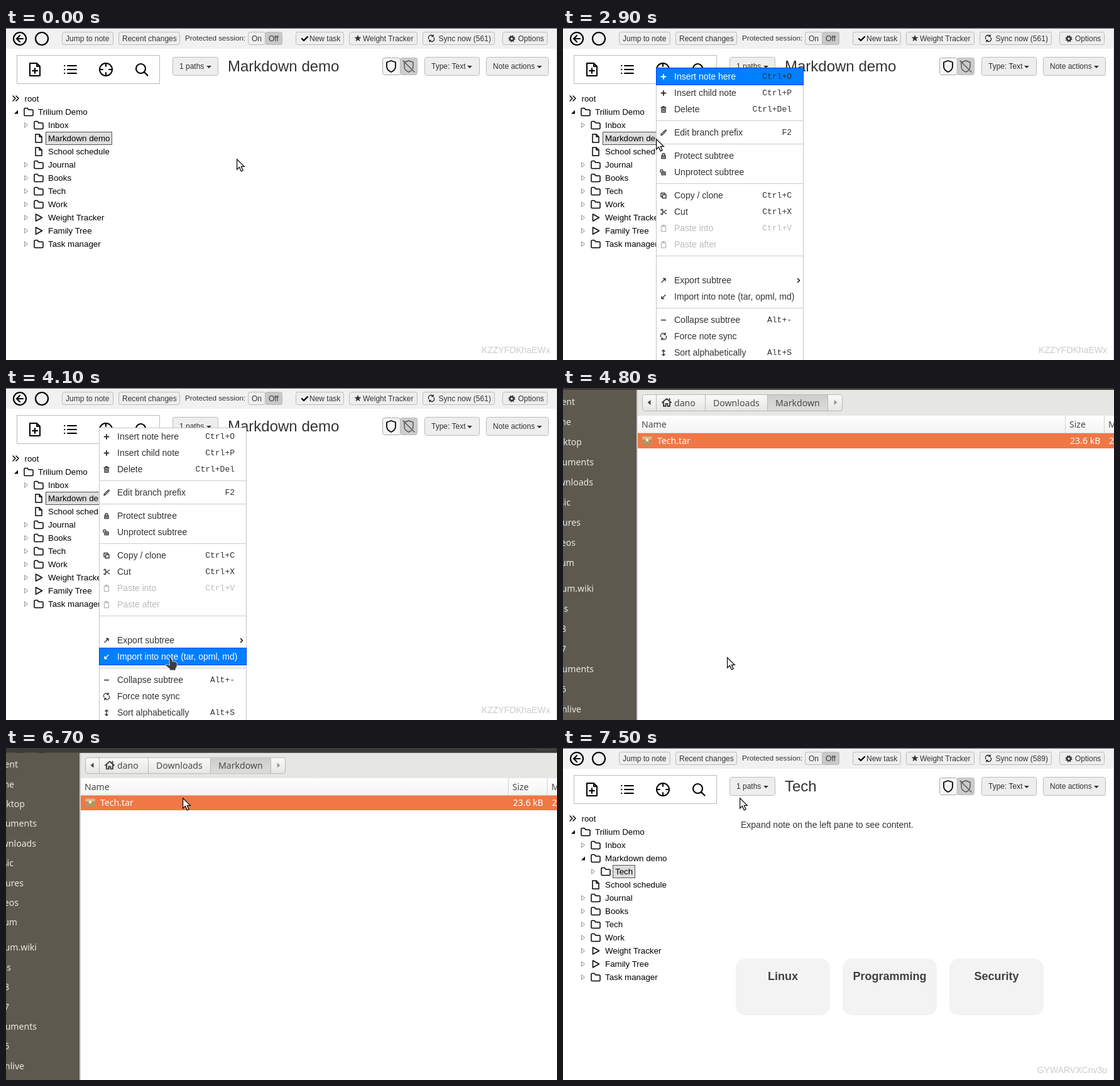
Write an HTML page that moves like this. It is 877x528 px and loops after 8000 ms.

```html
<!DOCTYPE html>
<html lang="en">
<head>
<meta charset="utf-8">
<title>Importing into a note</title>
<style>
  html, body { margin: 0; width: 100%; height: 100%; overflow: hidden; background: #fff; }
  svg { display: block; font-family: "Liberation Sans", Arial, sans-serif; }
  .mono { font: 13px "Liberation Mono", monospace; }
  .files { font-family: "Noto Sans", sans-serif; }
  .line { fill: none; stroke: currentColor; stroke-linecap: round; stroke-linejoin: round; }
</style>
</head>
<body>
<svg id="stage" width="877" height="528" viewBox="0 0 877 528"></svg>
<script>
const rect = (x, y, w, h, fill, stroke = 'none', rx = 0, more = '') =>
  `<rect x="${x}" y="${y}" width="${w}" height="${h}" fill="${fill}" stroke="${stroke}" rx="${rx}" ${more}/>`;
const text = (x, y, str, size = 12, fill = '#333', more = '') =>
  `<text x="${x}" y="${y}" font-size="${size}" fill="${fill}" ${more}>${str}</text>`;
const line = (d, x, y, width = 1.6, more = '') =>
  `<path class="line" d="${d}" transform="translate(${x} ${y})" stroke-width="${width}" ${more}/>`;
const solid = (d, x, y, fill = '#333') =>
  `<path d="${d}" transform="translate(${x} ${y})" fill="${fill}"/>`;
const group = (id, body, more = '') => `<g id="${id}" ${more}>${body}</g>`;

const SYNC = 'M-4 1A4 4 0 0 1 3-3M4-1A4 4 0 0 1-3 3M3-5.5V-3H.5M-3 5.5V3H-.5';
const FOLDER = 'M-7 4.5V-4.5Q-7-6-5.5-6H-2L0-3.5H5.5Q7-3.5 7-2V4.5Q7 6 5.5 6H-5.5Q-7 6-7 4.5Z';
const PAGE = 'M-5-6.5H1L5-2.5V6.5H-5ZM1-6.5V-2.5H5';
const PLAY = 'M-4.5-5.5L5.5 0L-4.5 5.5Z';
const CARET = 'M-4-2H4L0 2Z';
const SHIELD = 'M0-9L7-6.5V0Q7 6 0 9Q-7 6-7 0V-6.5Z';

// Main window
const button = (x, y, w, h, label, textX, fill = '#eee') =>
  rect(x + .5, y + .5, w - 1, h - 1, fill, '#bbb', 3) + text(textX, y + h / 2 + 4, label);

function star() {
  let d = '';
  for (let i = 0; i < 10; i++) {
    const a = i * Math.PI / 5, r = i % 2 ? 2.4 : 5.8;
    d += `${i ? 'L' : 'M'}${(r * Math.sin(a)).toFixed(2)} ${(-r * Math.cos(a)).toFixed(2)}`;
  }
  return d + 'Z';
}

const topBar = sync =>
  rect(0, 0, 877, 33, '#f1f1f1') + rect(0, 0, 877, 1, '#555') +
  [22, 57].map((x, i) =>
    `<circle cx="${x}" cy="17" r="10" fill="none" stroke="#000" stroke-width="2.2"/>` +
    line('M-5 0H5M0-5L-5 0L0 5', x, 17, 2.2, i ? 'style="rotate:180deg"' : '')).join('') +
  button(89, 6, 82, 21, 'Jump to note', 95) + button(179, 6, 98, 21, 'Recent changes', 185) +
  text(285, 20, 'Protected session:', 11.7) +
  button(385, 6, 28, 21, 'On', 391) + button(412, 6, 28, 21, 'Off', 418, '#c8c8c8') +
  button(461, 6, 77, 21, 'New task', 483) + line('M-4 0L-1 3L5-3', 475, 17, 2.4) +
  button(546, 6, 109, 21, 'Weight Tracker', 568) + solid(star(), 560, 16.5) +
  button(663, 6, 115, 21, `Sync now (${sync})`, 688.5) + line(SYNC, 677, 16.5, 1.2) +
  button(790, 6, 72, 21, 'Options', 815) +
  `<circle cx="805" cy="17" r="3" fill="none" stroke="#333" stroke-width="2.4"/>` +
  `<circle cx="805" cy="17" r="4.7" fill="none" stroke="#333" stroke-width="1.6" stroke-dasharray="1.85"/>`;

const noteHeader = title =>
  rect(17.5, 43.5, 227, 45, '#fff', '#bbb') +
  line('M-8-10H3L8-5V10H-8ZM3-10V-5H8M-4 2H4M0-2V6', 46, 66, 2) +
  line('M-4-6H10M-4 0H10M-4 6H10M-9-6H-8.5M-9 0H-8.5M-9 6H-8.5', 102, 66, 2) +
  line('M-10 0A10 10 0 0 1 10 0A10 10 0 0 1-10 0M0-10V-5M0 10V5M-10 0H-5M10 0H5', 159, 66, 2) +
  line('M-9-1.5A7.5 7.5 0 0 1 6-1.5A7.5 7.5 0 0 1-9-1.5M4 4L9.5 9.5', 216, 66, 2.2) +
  button(265, 46, 73, 30, '1 paths', 276) + solid(CARET, 323, 62) +
  text(353, 69, title, 24) +
  rect(599.5, 47.5, 28, 27, '#f4f4f4', '#aaa', 3) + rect(627.5, 47.5, 27, 27, '#ccc', '#bbb', 3) +
  line(SHIELD, 613, 61, 1.8) + line(SHIELD + 'M-9-9L9 9', 641, 61, 1.5, 'color="#555"') +
  button(666, 46, 88, 30, 'Type: Text', 677) + solid(CARET, 738, 62) +
  button(764, 46, 100, 30, 'Note actions', 775) + solid(CARET, 849, 62);

// Tree rows: [level, label, icon, expanded]
const treeRows = (rows, top) => rows.map(([level, label, icon = FOLDER, open], i) => {
  const x = level * 16, y = top + i * 21;
  const toggle = icon === PAGE ? '' : open ? solid('M3-3V3H-3Z', x, y, '#000')
    : line('M-2-3.5L2.5 0L-2 3.5Z', x, y, 1, 'color="#888"');
  return toggle + line(icon, x + 20, y, 1.5) + text(x + 35, y + 4.5, label, 13.33, '#000');
}).join('');

const rootRow = line('M0-4L4 0L0 4M5-4L9 0L5 4', 11, 112, 1.5) + text(29.5, 117, 'root', 13.33, '#000');
const tail = [[2, 'Journal'], [2, 'Books'], [2, 'Tech'], [2, 'Work'],
  [2, 'Weight Tracker', PLAY], [2, 'Family Tree', PLAY], [2, 'Task manager']];
const head = [[1, 'Trilium Demo', FOLDER, true], [2, 'Inbox']];
const noteId = id => text(866, 517, id, 14, '#ccc', 'text-anchor="end"');
const card = (x, label) => rect(x, 335, 150, 90, '#f3f3f3', 'none', 15) +
  text(x + 75, 369, label, 18, '#404040', 'text-anchor="middle" font-weight="bold"');

const before = topBar(561) + noteHeader('Markdown demo') +
  rect(63.5, 165.5, 105, 20, '#ddd', '#555', 0, 'id="active"') +
  rect(62.5, 186.5, 105, 20, '#e5f3fb', '#70c0e7', 0, 'id="hover"') + rootRow +
  treeRows([...head, [2, 'Markdown demo', PAGE], [2, 'School schedule', PAGE], ...tail], 133.5) +
  noteId('KZZYFDKhaEWx');

const after = topBar(589) + noteHeader('Tech') + rect(79.5, 186.5, 35, 20, '#ddd', '#555') + rootRow +
  treeRows([...head, [2, 'Markdown demo', FOLDER, true], [3, 'Tech'],
    [2, 'School schedule', PAGE], ...tail], 133.5) +
  text(283, 127, 'Expand note on the left pane to see content.', 14) +
  card(275, 'Linux') + card(445, 'Programming') + card(615, 'Security') + noteId('GYWARVXCnv3u');

// Context menu: [label, shortcut, icon], a number is a separator with extra space below
const PLUS = 'M-3.5 0H3.5M0-3.5V3.5';
const CLIP = 'M-3.5-3.5H3.5V5H-3.5ZM-1.5-5H1.5V-3H-1.5Z';
const LOCK = 'M-3-.5H3V4H-3ZM-1.5 1.8H1.5';
const items = [
  ['Insert note here', 'Ctrl+O', PLUS], ['Insert child note', 'Ctrl+P', PLUS],
  ['Delete', 'Ctrl+Del', 'M-4-3H4M-1.5-4.5H1.5M-3-3V4.5H3V-3M-1-1V2.5M1-1V2.5'], 0,
  ['Edit branch prefix', 'F2', 'M-4 4L-3.5 2L2-3.5L3.5-2L-2 3.5ZM3.5-4.5L4.5-3.5'], 0,
  ['Protect subtree', '', LOCK + 'M-2-1V-2A2 2 0 0 1 2-2V-1'],
  ['Unprotect subtree', '', LOCK + 'M-1-1V-2A2 2 0 0 0-5-2V0'], 0,
  ['Copy / clone', 'Ctrl+C', 'M-1.5-1.5H4V4H-1.5ZM-2 2H-4V-4H2V-2'],
  ['Cut', 'Ctrl+X', 'M4.5-3L-2 1.5M4.5 3L-2-1.5M-2-1.5A1.4 1.4 0 1 0-4-2.5M-2 1.5A1.4 1.4 0 1 1-4 2.5'],
  ['Paste into', 'Ctrl+V', CLIP], ['Paste after', '', CLIP], 20,
  ['Export subtree', '', 'M-3 3L3-3M-.5-3H3V.5'],
  ['Import into note (tar, opml, md)', '', 'M3-3L-3 3M.5 3H-3V-.5'], 0,
  ['Collapse subtree', 'Alt+-', 'M-3.5 0H3.5'], ['Force note sync', '', SYNC],
  ['Sort alphabetically', 'Alt+S', 'M0-4.5V4.5M-2-2.5L0-4.5L2-2.5M-2 2.5L0 4.5L2 2.5'],
];
const rowCenters = [];
let rowY = 77, rowMarkup = '';
for (const item of items) {
  if (typeof item === 'number') {
    rowMarkup += rect(149, rowY - 8, 233, 1, '#ccc');
    rowY += 11 + item;
    continue;
  }
  const [label, keys, icon] = item, ink = label.startsWith('Paste') ? '#bbb' : '#333';
  rowMarkup += `<g class="row" color="${ink}">` + text(177, rowY + 5, label, 14, 'currentColor') +
    line(icon, 160, rowY + .5, icon === PLUS ? 1.9 : 1.4) + '</g>' +
    text(364, rowY + 3.5, keys, 13, ink, 'class="mono" text-anchor="end"');
  rowCenters.push(rowY);
  rowY += 26;
}
const menu = rect(148.5, 63.5, 234, 500, '#fff', '#c5c5c5', 0, 'id="menuBox"') +
  group('menuRows', rect(148.5, 63.5, 234, 27, '#007fff', '#003eff', 0, 'id="focus"') + rowMarkup +
    line('M-1.5-3L1.5 0L-1.5 3', 375, 401.5, 1.4), 'clip-path="url(#slide)"') +
  group('submenu', rect(382.5, 368.5, 108, 81, '#fff', '#c5c5c5') +
    ['Native Tar', 'OPML', 'Markdown'].map((s, i) => text(411, 388 + i * 26, s, 14)).join(''));

// File chooser
const places = ['Recent', 'Home', 'Desktop', 'Documents', 'Downloads', 'Music', 'Pictures', 'Videos',
  'Trilium', 'trilium.wiki', 'Plans', '2018', '2017', 'Documents', '2016', 'unlive'];
const placeEnds = [19, 13, 30, 49, 48, 12, 28, 20, 18, 49, 8, 5, 5, 49, 5, 29];
const label = (x, y, s, fill = '#4a4a48', more = '') => text(x, y, s, 14.1, fill, more);
const dialog = rect(0, -40, 877, 43, '#3c3b37') + rect(843.5, -20, 30, 18, 'none', '#53524c', 3) +
  rect(0, 3, 118, 560, '#5e594e') + rect(117, 3, 2, 560, '#cbc9c4') +
  places.map((s, i) => label(placeEnds[i], 27 + i * 32 + (i > 8 ? 9 : 0), s, '#e9e7e1', 'text-anchor="end"')).join('') +
  rect(119, 3, 758, 41, '#e6e6e2') +
  rect(126.5, 10.5, 318, 26, 'url(#raised)', '#b9b8b3', 4) + rect(326, 11, 96, 25, 'url(#pressed)') +
  [148, 226, 325, 421].map(x => rect(x, 11, 1, 25, '#b9b8b3')).join('') +
  solid('M2.5-4V4L-2.5 0Z', 137, 23, '#444') + solid('M-2.5-4V4L2.5 0Z', 434, 23, '#999') +
  line('M-7 0L0-6L7 0M-5-1V6H-1.5V2H1.5V6H5V-1M4.5-6V-3', 165, 23, 2, 'color="#444"') +
  label(177, 29, 'dano') + label(239, 29, 'Downloads') + label(338, 29, 'Markdown') +
  rect(119, 44, 758, 520, '#fff') + rect(119, 44, 758, 28, 'url(#header)') + rect(119, 71, 758, 1, '#dcdbd8') +
  rect(799, 44, 1, 27, '#d5d4d0') + rect(861, 44, 1, 27, '#d5d4d0') +
  label(125, 63, 'Name') + label(806, 63, 'Size') + label(868, 63, 'Modified') +
  rect(119, 72, 758, 24, '#f07746') +
  rect(126, 77, 16, 14, '#b79262', 'none', 2) + rect(126, 77, 16, 5, '#d3b88c', 'none', 2) +
  rect(132, 80, 4, 5, '#efe3c8') +
  label(150, 89, 'Tech.tar', '#fff') + label(807, 89, '23.6 kB', '#fff') + label(869, 89, '2018', '#fff');

const gradient = (id, from, to) => `<linearGradient id="${id}" x2="0" y2="1">` +
  `<stop stop-color="${from}"/><stop offset="1" stop-color="${to}"/></linearGradient>`;

document.getElementById('stage').innerHTML =
  `<defs>${gradient('raised', '#fafaf9', '#e6e6e3')}${gradient('pressed', '#cdcdca', '#dcdcd9')}` +
  gradient('header', '#fff', '#f3f3f2') +
  `<clipPath id="slide"><rect id="slideBox" x="148" y="63" width="236" height="500"/></clipPath></defs>` +
  group('before', before) + group('after', after) + rect(876, 1, 1, 527, '#dcd6cf') +
  group('menu', menu) + group('dialog', dialog, 'class="files"') +
  group('pointer',
    '<path id="arrow" d="M.6 .8V17L4.4 13.4L7.3 19.8L10.1 18.5L7.3 12.3H12.3Z" fill="#fff" stroke="#111" stroke-width="1.3"/>' +
    '<path id="hand" d="M-1.6 1Q0-1.5 2 1L4 7Q6 6 7 7.5Q9 7 9.5 8.5Q11 8 11.5 10L11 15L9 18V21H0L-1 18L-7 13.5Q-8 11.5-5.5 11.5L-.5 13Z" fill="#3d3d3d" stroke="#fff" stroke-width=".7"/>');

// Pointer moves: start, end, target x, y and an optional bend point
const moves = [
  [400, 600, 301, 198], [700, 1200, 148, 176], [2900, 3400, 250, 404],
  [3700, 4100, 261, 428], [5200, 5800, 281, 79, 325, 250],
];
const $ = id => document.getElementById(id);
const show = (id, on) => $(id).setAttribute('display', on ? 'inline' : 'none');
const rows = [...document.querySelectorAll('.row')];
const inks = rows.map(row => row.getAttribute('color'));
const within = (t, from, to) => t >= from && t < to;
const smooth = k => (k = Math.min(1, Math.max(0, k)), k * k * (3 - 2 * k));

function pointerAt(t) {
  let x = 367, y = 208;
  for (const [from, to, tx, ty, bx = (x + tx) / 2, by = (y + ty) / 2] of moves) {
    if (t < from) break;
    const k = smooth((t - from) / (to - from));
    const mix = (a, b, c) => (1 - k) ** 2 * a + 2 * k * (1 - k) * b + k * k * c;
    [x, y] = [mix(x, bx, tx), mix(y, by, ty)];
  }
  return [Math.round(x), Math.round(y)];
}

function draw() {
  const t = Math.floor(performance.now() % 8000 / 100) * 100;
  const [x, y] = pointerAt(t);
  const hand = within(t, 1200, 2300) || within(t, 3000, 4600);
  $('pointer').setAttribute('transform', `translate(${x} ${y})`);
  show('hand', hand);
  show('arrow', !hand);

  show('before', t < 7000);
  show('after', t >= 7000);
  show('hover', within(t, 500, 1100));
  const lit = within(t, 1600, 2900);
  $('active').setAttribute('fill', lit ? '#cbe8f6' : '#ddd');
  $('active').setAttribute('stroke', lit ? '#26a0da' : '#555');

  show('menu', within(t, 2300, 4600));
  show('submenu', within(t, 3800, 4100));
  const height = 500 * smooth((t - 2200) / 300);
  $('menuBox').setAttribute('height', height);
  $('slideBox').setAttribute('height', height);
  const focus = t < 2900 ? -1 : t < 3000 ? 0 : rowCenters.findIndex(c => Math.abs(c - y) <= 13);
  show('focus', focus >= 0);
  if (focus >= 0) $('focus').setAttribute('y', rowCenters[focus] - 13.5);
  rows.forEach((row, i) => row.setAttribute('color', i === focus ? '#fff' : inks[i]));

  // The chooser folds vertically and fades as it closes
  show('dialog', within(t, 4800, 7000));
  const fold = Math.max(0, (t - 6600) / 100);
  $('dialog').setAttribute('transform', `translate(0 247) scale(1 ${1 - .02 * fold ** 2}) translate(0 -247)`);
  $('dialog').setAttribute('opacity', 1 - Math.max(0, fold - 1) * .4);
  requestAnimationFrame(draw);
}
draw();
</script>
</body>
</html>
```
